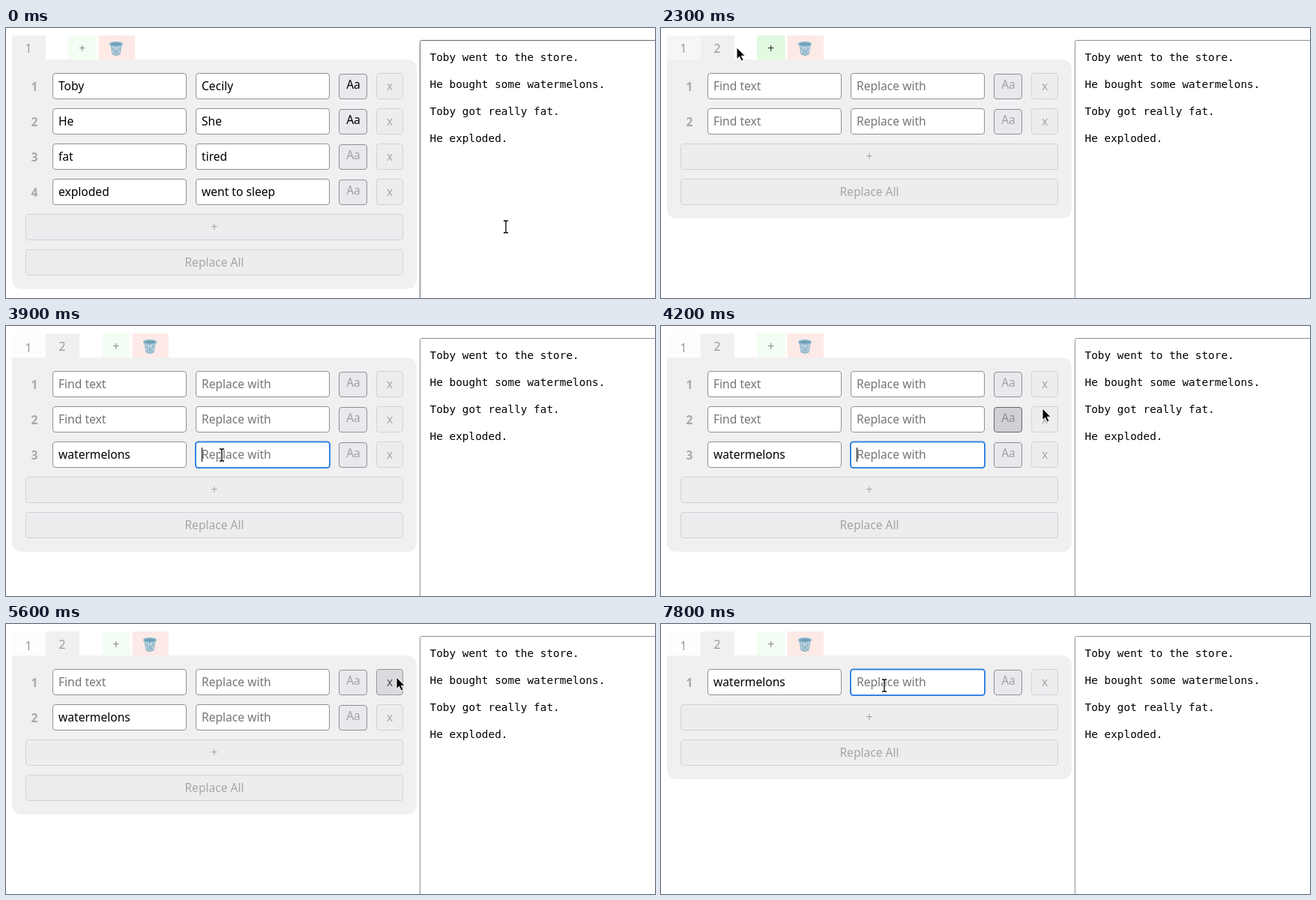
Animation, 866 px wide and 360 px high, one loop 8 s. Source, as an HTML page:

```html
<!DOCTYPE html>
<html lang="en">
<head>
<meta charset="utf-8">
<title>Find and replace</title>
<style>
  html, body { margin: 0; width: 100%; height: 100%; overflow: hidden; background: #fff; }
  svg { display: block; font: 15.6px "Noto Sans", "Open Sans", sans-serif; }
  .mono { font: 14.4px "DejaVu Sans Mono", monospace; }
  .mid { text-anchor: middle; }
  .num { text-anchor: middle; font-weight: 600; fill: #a9a9a9; }
</style>
</head>
<body>
<svg id="stage" width="866" height="360" viewBox="0 0 866 360"></svg>
<script>
const LOOP = 8000, STEP = 100;
const stage = document.getElementById('stage');

// Pointer path: time, x, y
const path = [
  [0, 667, 265], [200, 667, 265], [300, 652, 258], [500, 500, 190], [800, 230, 72],
  [1000, 135, 9], [1100, 112, 15], [1300, 80, 18], [1400, 92, 22], [1500, 101, 26],
  [2300, 101, 26], [2400, 150, 38], [2600, 560, 72], [2800, 747, 76], [3300, 747, 76],
  [3400, 700, 90], [3700, 310, 168], [3800, 288, 172], [3900, 288, 172], [4100, 465, 125],
  [4200, 509, 110], [4300, 545, 92], [4500, 580, 80], [4700, 547, 73], [4900, 547, 73],
  [5000, 530, 69], [5100, 530, 69], [5200, 521, 71], [5700, 521, 71], [6000, 290, 115],
  [6200, 285, 110], [6500, 298, 82], [8000, 298, 82]
];

const blank = ['', ''], melons = ['watermelons', ''];
const layouts = [
  [0, [['Toby', 'Cecily', 1], ['He', 'She', 1], ['fat', 'tired'], ['exploded', 'went to sleep']]],
  [2300, [blank, blank]],
  [3900, [blank, blank, melons]],
  [5500, [blank, melons]],
  [5700, [melons]]
];
const story = ['Toby went to the store.', 'He bought some watermelons.', 'Toby got really fat.', 'He exploded.'];

const between = (t, a, b) => t >= a && t < b;
const rowY = i => 60 + 47 * i;
const layoutAt = t => layouts.filter(l => l[0] <= t).pop();
const plusX = t => t < 2300 ? 83 : 128;

function pointerAt(t) {
  const i = Math.max(1, path.findIndex(p => p[0] >= t));
  const [t0, x0, y0] = path[i - 1], [t1, x1, y1] = path[i];
  const k = (t - t0) / (t1 - t0);
  return [x0 + (x1 - x0) * k, y0 + (y1 - y0) * k];
}

function hit(t) {
  t = Math.max(0, t);
  const [x, y] = pointerAt(t), count = layoutAt(t)[1].length;
  if (x >= 552 && y >= 16) return 'text';
  if (y >= 10 && y < 42 && between(x, plusX(t), plusX(t) + 38)) return 'tab';
  const i = Math.floor((y - 60) / 47);
  if (i < 0 || i > count + 1 || y - rowY(i) > 35) return '';
  if (i >= count) return between(x, 26, 530) ? (i === count ? 'add' : 'all') : '';
  const column = [['find', 62, 241], ['with', 253, 432], ['case', 444, 482], ['del', 494, 530]]
    .find(c => between(x, c[1], c[2]));
  return column ? column[0] + i : '';
}

// Hover fades over two steps and starts afresh when rows are added or removed.
function hover(t, id) {
  const start = layoutAt(t)[0];
  const on = s => (id === 'tab' || s >= start) && hit(s) === id ? .5 : 0;
  return on(t - STEP) + on(t - 2 * STEP);
}

const rect = (x, y, w, h, fill, stroke = 'none', sw = 1, r = 3.5) =>
  `<rect x="${x}" y="${y}" width="${w}" height="${h}" rx="${r}" fill="${fill}" stroke="${stroke}" stroke-width="${sw}"/>`;
const text = (x, y, s, fill = '#000', cls = '') =>
  `<text x="${x}" y="${y}" fill="${fill}" class="${cls}">${s}</text>`;
const mix = (a, b, k) => `rgb(${a.map((v, i) => Math.round(v + (b[i] - v) * k))})`;

function input(x, y, value, hint, hovered, focused) {
  const edge = focused
    ? rect(x, y + .5, 179, 34.5, '#fff', '#3584e4', 2)
    : rect(x + .5, y + .5, 178, 34, '#fff', hovered ? '#676774' : '#8f8f9d');
  return edge + text(x + 8, y + 22.5, value || hint, value ? '#000' : '#757575');
}

function button(x, y, w, label, level) {
  return `<g opacity="${.3 + .7 * level}">` +
    rect(x + .5, y + .5, w - 1, 34, level ? '#d0d0d7' : '#e9e9ed', level ? '#676774' : '#8f8f9d') +
    text(x + w / 2, y + 22.5, label, '#000', 'mid') + '</g>';
}

function bin(x) {
  return `<g transform="translate(${x} 18)" fill="none" stroke="#7fa9bd">
    <path d="M2 4L4 17Q9 20 14 17L16 4Z" fill="#c6dce6" stroke="#86b0c3"/>
    <path d="M5 6L7 18M9 7V19M13 6L11 18M3 9L14 17M15 9L4 17" stroke-width=".9"/>
    <ellipse cx="9" cy="3.5" rx="8.3" ry="2.8" fill="#6f9db2" stroke="#8fc0d6" stroke-width="1.5"/></g>`;
}

function tabs(t) {
  const x = plusX(t), level = hover(t, 'tab'), second = t >= 2300;
  const tabFill = !second ? '#f0f0f0' : t < 2400 ? '#f6f6f6' : '#fdfdfd';
  const tab = (left, w, fill) => rect(left, 10, w, 32, fill, 'none', 0, 0);
  return tab(8, 45, tabFill) + text(30, t >= 2400 ? 35 : 33, 1, '#999', 'mid') +
    (second ? tab(53, 45, '#f0f0f0') + text(75, 33, 2, '#999', 'mid') : '') +
    tab(x, 37.5, mix([243, 253, 243], [225, 249, 225], level)) +
    text(x + 18.7, 33, '+', mix([140, 146, 140], [50, 55, 50], level), 'mid') +
    tab(x + 40.5, 48.5, '#fdeae7') + bin(x + 55);
}

function panel(t) {
  const rows = layoutAt(t)[1], n = rows.length, last = hit(t - STEP);
  const focus = between(t, 3900, 5300) ? 2 : t >= 6500 ? 0 : -1;
  const bottom = 66 + 47 * (n + 2);
  let out = `<path d="M8 42H534Q548 42 548 56V${bottom - 14}Q548 ${bottom} 534 ${bottom}H22Q8 ${bottom} 8 ${bottom - 14}Z" fill="#f0f0f0"/>`;
  rows.forEach(([find, swap, exact], i) => {
    const y = rowY(i), over = last === 'case' + i;
    out += text(38, y + 23.5, i + 1, '#a9a9a9', 'num') +
      input(62, y, find, 'Find text', last === 'find' + i, false) +
      input(253, y, swap, 'Replace with', last === 'with' + i, focus === i) +
      rect(444.5, y + 1.5, 37, 33, over ? '#d0d0d7' : '#e9e9ed', over ? '#676774' : '#8f8f9d') +
      text(463.5, y + 20.5, 'Aa', exact ? '#000' : over ? '#8e8e93' : '#a2a2a5', 'mid') +
      button(494, y, 36, 'x', hover(t, 'del' + i));
    if (focus === i && t < 7800) out += rect(261, y + 8, 1, 19, '#000', 'none', 0, 0);
  });
  return out + button(26, rowY(n), 504, '+', hover(t, 'add')) +
    button(26, rowY(n + 1), 504, 'Replace All', hover(t, 'all'));
}

function editor(t) {
  const focused = between(t, 3100, 3800), selected = between(t, 3200, 3800);
  let out = focused
    ? rect(552, 16, 330, 360, '#fff', '#3584e4', 2, 3)
    : rect(552.5, 16.5, 330, 360, '#fff', hit(t - STEP) === 'text' ? '#676774' : '#8f8f9d', 1, 2);
  if (selected) out += rect(696, 66, 95, 18, '#3584e4', 'none', 0, 0);
  story.forEach((line, i) => {
    const s = selected ? line.replace('watermelons', '<tspan fill="#fff">$&</tspan>') : line;
    out += text(565.5, 44 + 36 * i, s, '#000', 'mono');
  });
  return out;
}

function pointer(t) {
  const [x, y] = pointerAt(t);
  const beam = 'M-3 -8H-1L0 -7L1 -8H3M0 -7V7M-3 8H-1L0 7L1 8H3';
  const shape = /^(text|find|with)/.test(hit(t))
    ? `<path d="${beam}" fill="none" stroke="#fff" stroke-width="3"/><path d="${beam}" fill="none" stroke="#000" stroke-width="1.3"/>`
    : '<path d="M0 0V15.5L3.6 12.2L6.3 18L9 16.8L6.4 11.2H11.3Z" fill="#000" stroke="#fff"/>';
  return `<g transform="translate(${x} ${y})">${shape}</g>`;
}

let shown = -1;
function draw() {
  const t = Math.floor(performance.now() % LOOP / STEP) * STEP;
  if (t !== shown) {
    shown = t;
    stage.innerHTML = tabs(t) + panel(t) + editor(t) + pointer(t);
  }
  requestAnimationFrame(draw);
}
draw();
</script>
</body>
</html>
```
